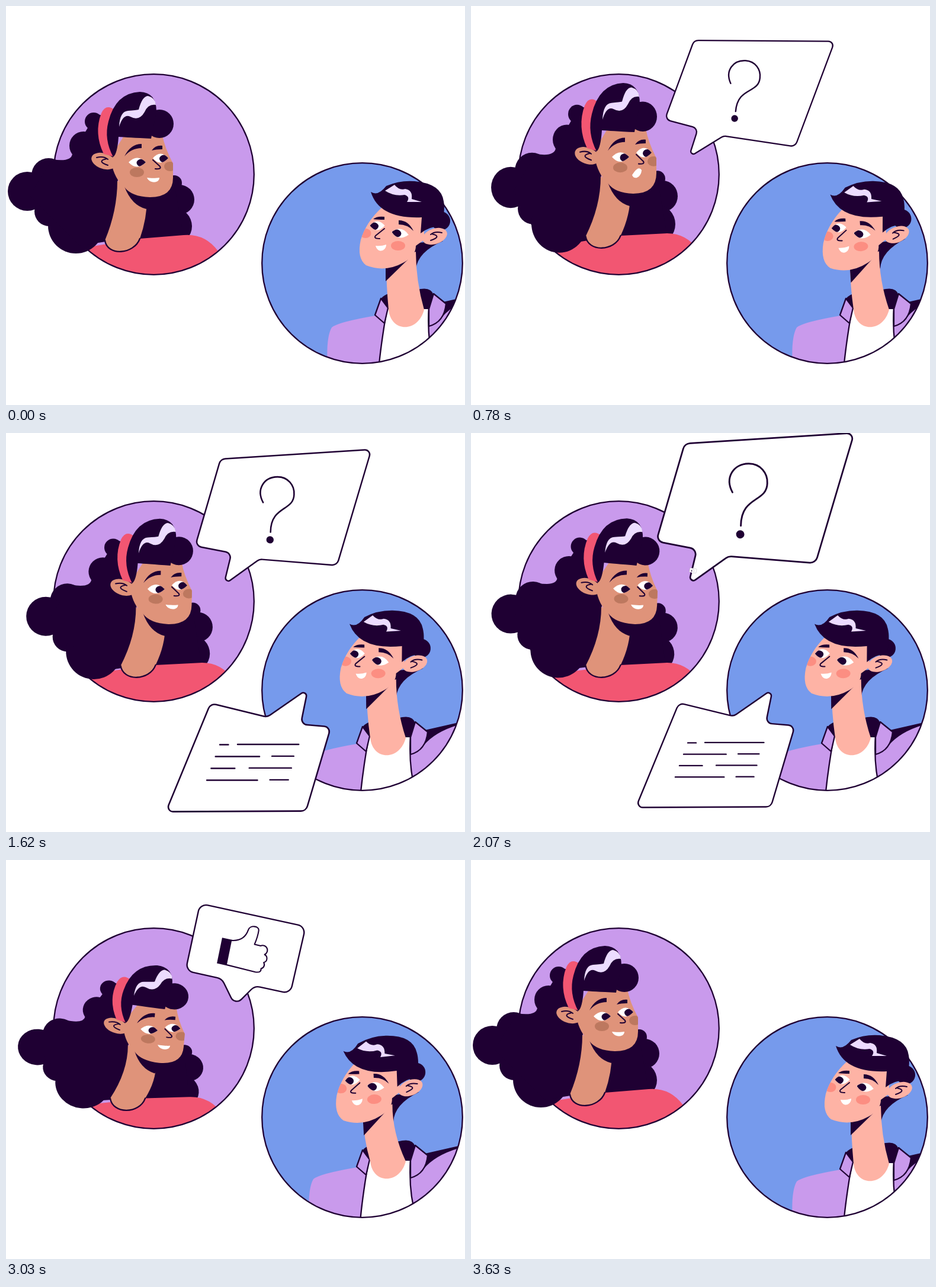
An HTML page with a canvas that plays this animation: 775x674 px, repeating every 3660 ms.

```html
<!DOCTYPE html>
<html lang="en">
<head>
<meta charset="utf-8">
<title>Conversation</title>
<style>
html, body { margin: 0; width: 100%; height: 100%; overflow: hidden; background: #fff; }
canvas { display: block; }
</style>
</head>
<body>
<canvas id="stage" width="775" height="674"></canvas>
<script>
const ctx = document.getElementById('stage').getContext('2d');
const LOOP = 3660, STEP = 30, BEAT = 540;
const INK = '#1f0033', LILAC = '#c99aec', BLUE = '#769aec', CORAL = '#f25672',
  TAN = '#df937a', TAN_BLUSH = '#bd785f', PINK = '#feb3a5', PINK_BLUSH = '#fc8e82',
  SHINE = '#ecdcff', WHITE = '#fff';

// Motion rules: eased step, eased stay, short swell and a steady sway.
const ramp = (t, from, to) => {
  const u = Math.min(1, Math.max(0, (t - from) / (to - from)));
  return u * u * (3 - 2 * u);
};
const stay = (t, inFrom, inTo, outFrom, outTo) => ramp(t, inFrom, inTo) - ramp(t, outFrom, outTo);
const pulse = (t, peak, half) => {
  const u = Math.abs(t - peak) / half;
  return u < 1 ? Math.cos(u * Math.PI / 2) ** 2 : 0;
};
const sway = (t, peak) => Math.cos((t - peak) / BEAT * Math.PI * 2);

const matrix = (px, py, dx, dy, rot = 0, sx = 1, sy = sx) => new DOMMatrix()
  .translateSelf(px + dx, py + dy).rotateSelf(rot * 180 / Math.PI)
  .scaleSelf(sx, sy).translateSelf(-px, -py);

function within(m, draw, clip) {
  ctx.save();
  if (clip) ctx.clip(shape(clip));
  ctx.transform(m.a, m.b, m.c, m.d, m.e, m.f);
  draw();
  ctx.restore();
}

const shape = d => d instanceof Path2D ? d : new Path2D(d);
function fill(color, d) {
  ctx.fillStyle = color;
  ctx.fill(shape(d));
}
function line(d, width = 2.3) {
  ctx.strokeStyle = INK;
  ctx.lineWidth = width;
  ctx.lineCap = ctx.lineJoin = 'round';
  ctx.stroke(shape(d));
}
function oval(x, y, rx, ry = rx, rot = 0) {
  const p = new Path2D();
  p.ellipse(x, y, rx, ry, rot, 0, Math.PI * 2);
  return p;
}
function clipped(area, draw) {
  ctx.save();
  ctx.clip(shape(area));
  draw();
  ctx.restore();
}
const curls = (...circles) => circles.forEach(c => fill(INK, oval(...c)));

// Sharper corners get a smaller radius.
function roundPoly(softness, points) {
  const p = new Path2D(), n = points.length;
  points.forEach(([x, y], i) => {
    const [ax, ay] = points[(i + n - 1) % n], [bx, by] = points[(i + 1) % n];
    const turn = Math.atan2(ay - y, ax - x) - Math.atan2(by - y, bx - x);
    if (!i) p.moveTo((ax + x) / 2, (ay + y) / 2);
    p.arcTo(x, y, bx, by, softness * Math.abs(Math.sin(turn / 2)));
  });
  p.closePath();
  return p;
}

// The neck hangs between two jaw points and two collar points.
function drawNeck(color, head, body, jaw, collar, depth, outline) {
  const place = m => ([x, y]) => m.transformPoint({ x, y });
  const [jl, jr] = jaw.map(place(head)), [cl, cr] = collar.map(place(body));
  const side = (j, c) => `${j.x} ${(j.y + c.y) / 2}`;
  const base = `C${cl.x + 4} ${cl.y + depth} ${cr.x - 10} ${cr.y + depth} ${cr.x} ${cr.y}`;
  fill(color, `M${jl.x} ${jl.y}Q${side(jl, cl)} ${cl.x} ${cl.y}${base}Q${side(jr, cr)} ${jr.x} ${jr.y}Z`);
  if (outline) line(`M${cl.x} ${cl.y}${base}`);
}

function eye(x, y, w, look, tilt = 0) {
  const lens = `M${-w} 0Q0 -15 ${w} 0Q-1 15 ${-w} 0Z`;
  within(matrix(0, 0, x, y, tilt), () => {
    fill(WHITE, lens);
    clipped(lens, () => fill(INK, oval(look, 1, 8, 6.5)));
  });
}
function brow(x, y, dx, dy, thick) {
  fill(INK, `M${x} ${y}q${dx * .35} ${dy * .9 - 2} ${dx} ${dy}v${thick}q${-dx * .6} 0 ${-dx} ${-dy - thick}Z`);
}
function ear(color, x, y, side) {
  within(new DOMMatrix([side, 0, 0, 1, x, y]), () => {
    fill(color, oval(0, 0, 21.5, 13, .33));
    line('M-12 -6q12 -3 19 3M5 -4q-18 4 2 11', 2);
  });
}

const HER_RING = oval(249.5, 284.5, 169.3);
const HER_FACE = 'M183 245L200 218H264Q268 240 282 266V290Q282 323 243 323Q212 322 200 306Q183 292 178 265Z';
const HIS_FACE = 'M634 341Q608 365 599 395Q592 426 608 438Q640 451 672 433Q692 422 692 405L706 395V345Z';

function herBackHair() {
  curls([148, 195, 15], [131, 236, 24], [72, 286, 29], [36, 313, 33], [73, 347, 25], [118, 371, 47]);
  fill(INK, 'M152 182L112 250Q110 264 78 259L40 320L125 405L168 398L192 330L180 190Z');
}

function herFace(t) {
  fill(INK, 'M200 305Q212 337 237 343L255 318Z');
  fill(TAN, HER_FACE);
  ear(TAN, 165, 262, 1);
  fill(CORAL, 'M184 176Q169 164 161 181Q148 215 165 250L181 254L186 200Z');
  curls([259, 199, 24]);
  fill(INK, 'M181 255Q165 225 173 195Q185 147 226 145Q254 146 254 178L245 224Q205 222 190 221Q188 250 181 255Z');
  fill(SHINE, 'M191 204Q192 178 206 177T224 175Q230 152 240 152Q252 155 253 167Q240 165 234 179Q225 195 210 187Q198 181 191 204Z');
  brow(200, 254, 29, -21, 7);
  brow(246, 244, 18, -8, 6);
  eye(221.5, 264, 14.5, 7);
  clipped(HER_FACE, () => {
    fill(TAN_BLUSH, oval(277, 271, 10, 8));
    eye(261, 257, 13, 6);
  });
  line('M248 260L260 271Q263 276 252 275', 2);
  fill(TAN_BLUSH, oval(221, 281, 12, 8));

  const open = pulse(t, 820, 800) + .8 * pulse(t, 2610, 300);
  const left = 238 + 3 * open, right = 259 - 2 * open;
  const low = 290 + 3 * open, high = 290 - 5 * open, lift = 1 - 8 * open;
  fill(WHITE, `M${left} ${low}C${left + 5} ${low + lift} ${right - 5} ${high + lift} ${right} ${high}C${right} ${high + 10} ${left + 4} ${low + 10} ${left} ${low}Z`);
}

function drawWoman(t) {
  const lean = stay(t, 90, 450, 2790, 3270);
  const crouch = .4 * pulse(t, 240, 150) + pulse(t, 3030, 240);
  const stretch = pulse(t, 780, 400) + 1.2 * pulse(t, 3270, 210);
  const head = matrix(247, 323, 31 * lean - 4 * pulse(t, 1230, 400), 20 * crouch - 6 * stretch,
    .035 * lean * ramp(t, 1230, 2070) + .067 * crouch, 1, 1 - .08 * crouch + .05 * stretch);
  const body = matrix(196, 415, 26 * lean - 5 * crouch, 9 * crouch - 2 * lean - 4 * stretch,
    .03 * lean + .035 * crouch);

  fill(LILAC, HER_RING);
  within(head, () => {
    curls([284, 299, 13], [293, 327, 25], [283, 372, 31]);
    fill(INK, 'M200 305L284 300L300 390L190 400Z');
  });
  within(body, () => fill(CORAL, 'M40 500L90 415L226 393L300 387Q336 384 358 414L400 500Z'), HER_RING);
  line(HER_RING);
  within(head, herBackHair);
  drawNeck(TAN, head, body, [[188, 295], [238, 325]], [[167, 396], [226, 393]], 27, true);
  within(head, () => herFace(t));
}

function drawJacket() {
  fill(LILAC, 'M543 610Q540 560 550 543Q560 534 624 523L646 512L636 620H543Z');
  fill(LILAC, 'M712 500L742 503L800 485V620H712Z');
  fill(INK, 'M738 500L795 487V491Q755 503 736 526Z');
  fill(WHITE, 'M644 508Q633 570 629 615H726Q710 570 714 508Z');
  line('M644 508Q633 570 629 615M714 508Q710 570 726 615');
  fill(INK, 'M632 496Q642 481 670 484L700 478Q718 475 722 488L713 512H644Z');
  for (const collar of ['M633 494L623 522L639 536L645 510Z', 'M722 486L743 503Q740 534 714 541V512Z']) {
    fill(LILAC, collar);
    line(collar);
  }
}

function hisHair() {
  curls([734, 363, 16]);
  fill(INK, 'M616 314Q628 322 642 304Q665 294 690 296Q735 300 739 330Q742 345 735 372Q715 372 700 384L702 357Q630 360 616 314Z');
  fill(SHINE, 'M640 312L656 302Q664 312 674 309Q687 311 685 326L702 331H677Q683 322 673 319Q655 322 640 312Z');
}

function hisFace(hairTilt) {
  fill(INK, 'M641 438V465L679 428Z');
  fill(PINK, HIS_FACE);
  within(matrix(740, 350, 0, 0, hairTilt), hisHair);
  ear(PINK, 724, 389, -1);
  brow(620, 360, 19, -4, 5);
  brow(688, 380, -25, -18, 7);
  eye(627, 371, 12.5, -6);
  eye(665.5, 384, 14.5, -6, .17);
  line('M639 376L624 388Q620 393 631 393', 2);
  fill(PINK_BLUSH, oval(662, 405, 12, 8));
  clipped(HIS_FACE, () => fill(PINK_BLUSH, oval(607, 384, 9.5, 8)));
  fill(WHITE, 'M624 405Q634 406 642 403C642 414 628 419 624 405Z');
}

function drawMan(t) {
  const away = stay(t, 1230, 1530, 3030, 3330);
  const squash = pulse(t, 1230, 220);
  const settle = away * ramp(t, 2070, 2610);
  const listen = pulse(t, 780, 450);
  const hop = pulse(t, 3030, 240);
  const head = matrix(635, 443, -33 * away - 5 * settle - listen,
    3 * listen + squash + 1.5 * away + 3 * settle - 4 * hop,
    .03 * squash - .067 * listen - .01 * away - .045 * settle);
  const body = matrix(601.5, 434.5, -31 * away - 2 * squash, 2 * squash + 2 * away - 6 * hop,
    0, 1 + .017 * squash);
  const ring = oval(601.5, 434.5, 169.3 * (1 + .017 * squash));

  fill(BLUE, ring);
  within(body, drawJacket, ring);
  line(ring);
  within(head, () => fill(INK, 'M738 397Q695 415 692 445Q682 420 694 400Z'));
  drawNeck(PINK, head, body, [[642, 430], [692, 415]], [[646, 513], [706, 513]], 39);
  within(head, () => hisFace(-.055 * away));
}

const QUESTION_BOX = roundPoly(13, [[366, 57.5], [604, 46], [547, 228],
  [425, 216.5], [368, 256], [381, 206], [324, 194]]);
const ANSWER_BOX = roundPoly(13, [[509, 433], [498, 487], [544, 491],
  [506, 619], [293, 620], [361, 455], [447, 476]]);
const LIKE_BOX = roundPoly(18, [[324, 82], [497, 113], [476, 223],
  [418, 212.5], [387, 246], [364, 203], [304.5, 192]]);

// A bubble grows from a point near its tail and shrinks back to it.
function bubble(box, content, { x, y, shown, size, turn, from, spin = 0 }) {
  if (shown < .01) return;
  const hidden = 1 - shown;
  within(matrix(x, y, from[0] * hidden, from[1] * hidden, turn + spin * hidden, shown * size), () => {
    fill(WHITE, box);
    line(box);
    content();
  });
}

function drawQuestion() {
  line('M432 127C421 106 434 87 455 87C472 87 482 101 481 115C480 142 444 132 443 174', 2.4);
  fill(INK, oval(442, 186, 5.8));
}

// Four rows of two dashes, slanted with the sheet.
function drawAnswer() {
  for (let row = 0; row < 4; row++) {
    const x = 375 - row * 6.6, y = 518 + row * 18;
    const first = [13, 67, 36, 77][row], second = [93, 33, 64, 28][row];
    const gap = row % 2 ? 19 : 14 + row * 4;
    line(`M${x} ${y}h${first}m${gap} -.5h${second}`, 2.2);
  }
}

function drawLike() {
  line('M377 140Q398 141 404 122C406 114 421 114 421 122Q420 132 415 145L425 147A7 7 0 0 1 432 161A7 7 0 0 1 431 174A6.5 6.5 0 0 1 427 184Q428 191 418 190L371 180', 2);
  fill(INK, 'M362 136L378 139L371 181L355 178Z');
}

function drawBubbles(t) {
  const swell = ramp(t, 1500, 1920), lift = ramp(t, 2610, 2840);
  bubble(QUESTION_BOX, drawQuestion, {
    x: 374, y: 250 + 3 * swell, from: [-8, 0], spin: -.4,
    shown: stay(t, 240, 480, 2070, 2150),
    size: 1.02 + .16 * swell + .025 * sway(t, 480),
    turn: .055 * pulse(t, 780, 240) - .04 * pulse(t, 1020, 200) - .015 * ramp(t, 1230, 1620)
  });
  bubble(ANSWER_BOX, drawAnswer, {
    x: 502, y: 441, from: [23, 68], spin: -.6, turn: 0,
    shown: stay(t, 1190, 1470, 2610, 2695),
    size: 1.15 + (.08 + .07 * ramp(t, 2070, 2340)) * sway(t, 1800)
  });
  bubble(LIKE_BOX, drawLike, {
    x: 388, y: 239, from: [-15, -1], turn: .037 * lift,
    shown: stay(t, 2020, 2340, 3050, 3200),
    size: 1.04 + .07 * lift + (.04 + .08 * lift) * sway(t, 2840)
  });
}

function frame(now) {
  const t = Math.floor((now % LOOP) / STEP) * STEP;
  ctx.fillStyle = WHITE;
  ctx.fillRect(0, 0, 775, 674);
  drawWoman(t);
  drawMan(t);
  drawBubbles(t);
  requestAnimationFrame(frame);
}
requestAnimationFrame(frame);
</script>
</body>
</html>
```
